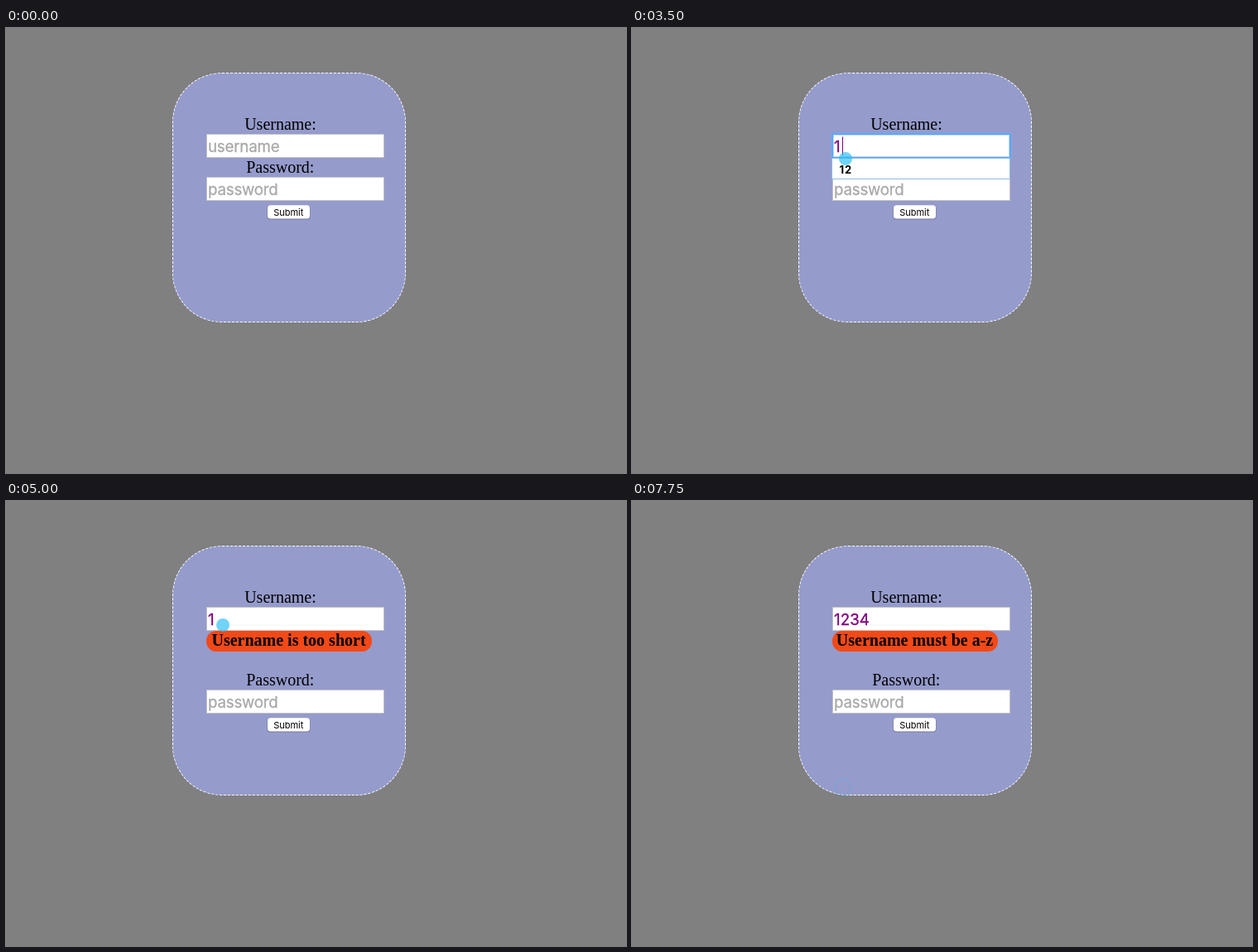
Animation of 749 by 538 pixels, one loop 8000 ms. Source, as an HTML page:

```html
<!DOCTYPE html>
<html lang="en">
<head>
<meta charset="utf-8">
<title>Login form</title>
<style>
  html, body { margin: 0; width: 100%; height: 100%; overflow: hidden; background: #808080; }
  #panel {
    position: absolute; left: 201px; top: 54px; width: 280px; height: 300px;
    border: 1px dashed #fff; border-radius: 60px; background: #959bcb;
  }
  svg { position: absolute; left: 0; top: 0; }
  .label { font: 20px "Liberation Serif", serif; text-anchor: middle; }
  .bold { font-weight: bold; }
  .entry {
    font: 18.7px Inter, sans-serif; letter-spacing: -.2px;
    fill: #a9a9a9; stroke: #a9a9a9; stroke-width: .3px;
  }
  #value.typed { fill: #800080; stroke: #800080; letter-spacing: .1px; }
  .small { font: 11px Inter, sans-serif; text-anchor: middle; }
  .option { font: bold 13px Inter, sans-serif; letter-spacing: .8px; }
  .field { fill: #fff; stroke: #c3c3c8; }
</style>
</head>
<body>
<div id="panel"></div>
<svg width="749" height="538" viewBox="0 0 749 538">
  <text class="label" x="331.5" y="123">Username:</text>
  <rect class="field" x="242.5" y="128.5" width="214" height="28"/>
  <g id="lower">
    <text class="label" x="331.3" y="175">Password:</text>
    <rect class="field" x="242.5" y="180.5" width="214" height="28"/>
    <text class="entry" x="244" y="202">password</text>
    <rect x="315.5" y="214.5" width="52" height="17" rx="3.5" fill="#777a9c"/>
    <rect x="316" y="214.3" width="51" height="16.2" rx="3.5" fill="#fff"/>
    <text class="small" x="341.3" y="227">Submit</text>
  </g>
  <g id="error">
    <rect x="242" y="157" width="200" height="25" rx="12" fill="#f34917"/>
    <text id="message" class="label bold" x="341.5" y="175"></text>
  </g>
  <g id="focus" fill="none">
    <rect x="240.5" y="126.5" width="218" height="32" rx="2" stroke="#7fb0ea" stroke-opacity=".4"/>
    <rect x="242" y="128" width="215" height="29" rx="1" stroke="#5ea6f6" stroke-width="2"/>
    <rect x="243.5" y="129.5" width="212" height="26" stroke="#b9dafc"/>
  </g>
  <text id="value" class="entry" x="244" y="150"></text>
  <path id="caret" fill="none"/>
  <g id="list">
    <rect x="241.5" y="157.5" width="215" height="25" fill="#fff" stroke="#8fbbe9"/>
    <text class="option" x="250.5" y="175.5">12</text>
  </g>
  <circle id="dot" r="8" fill="#28bcf5" fill-opacity=".66"/>
  <circle id="ring" fill="none" stroke="#4bb4ea"/>
</svg>
<script>
const LOOP = 8000, STEP = 250;
const $ = id => document.getElementById(id);
const show = (id, on) => $(id).setAttribute("visibility", on ? "visible" : "hidden");
const set = (id, attrs) => {
  for (const key in attrs) $(id).setAttribute(key, attrs[key]);
};
const within = (t, from, to) => t >= from && t < to;
const latest = (t, list) => list.filter(item => t >= item[0]).pop();

// press time, release time, x, y
const clicks = [
  [750, 1250, 283, 163], [2000, 2500, 270, 152], [3500, 3750, 258, 158],
  [4250, 4500, 267, 255], [5000, 5250, 262, 150], [6750, 7000, 271, 151],
  [7250, 7750, 255, 346]
];
const typing = [[0, ""], [3250, "1"], [6250, "123"], [7000, "1234"]];
const caretX = { "": 244.5, "1": 254.5, "123": 277.5, "1234": 289.5 };

function drawClick(t) {
  const [down, up, cx, cy] = latest(t, clicks) || [0, -LOOP, 0, 0];
  const age = Math.floor((t - up) / STEP);
  show("dot", within(t, down, up));
  show("ring", age === 0 || age === 1);
  set("dot", { cx, cy });
  set("ring", { cx, cy, r: 10 + 4 * age, "stroke-opacity": age ? .2 : .5 });
}

function draw(now) {
  const t = now % LOOP;
  const text = latest(t, typing)[1];
  const focused = within(t, 2250, 4500) || within(t, 5250, 7500);
  const failed = t >= 4500;

  $("value").textContent = text || "username";
  $("value").classList.toggle("typed", text !== "");
  $("message").textContent = t < 7500 ? "Username is too short" : "Username must be a-z";
  set("lower", { transform: `translate(0 ${failed ? 48 : 0})` });
  set("caret", { d: `M${caretX[text]} 131.5V154`, stroke: t < 6250 ? "#800080" : "#302040" });

  show("focus", focused);
  show("caret", focused && !within(t, 6000, 6250));
  show("error", failed);
  show("list", within(t, 3250, 4500) || within(t, 5750, 6000));
  drawClick(t);
  requestAnimationFrame(() => draw(performance.now() - start));
}
const start = performance.now();
draw(0);
</script>
</body>
</html>
```
